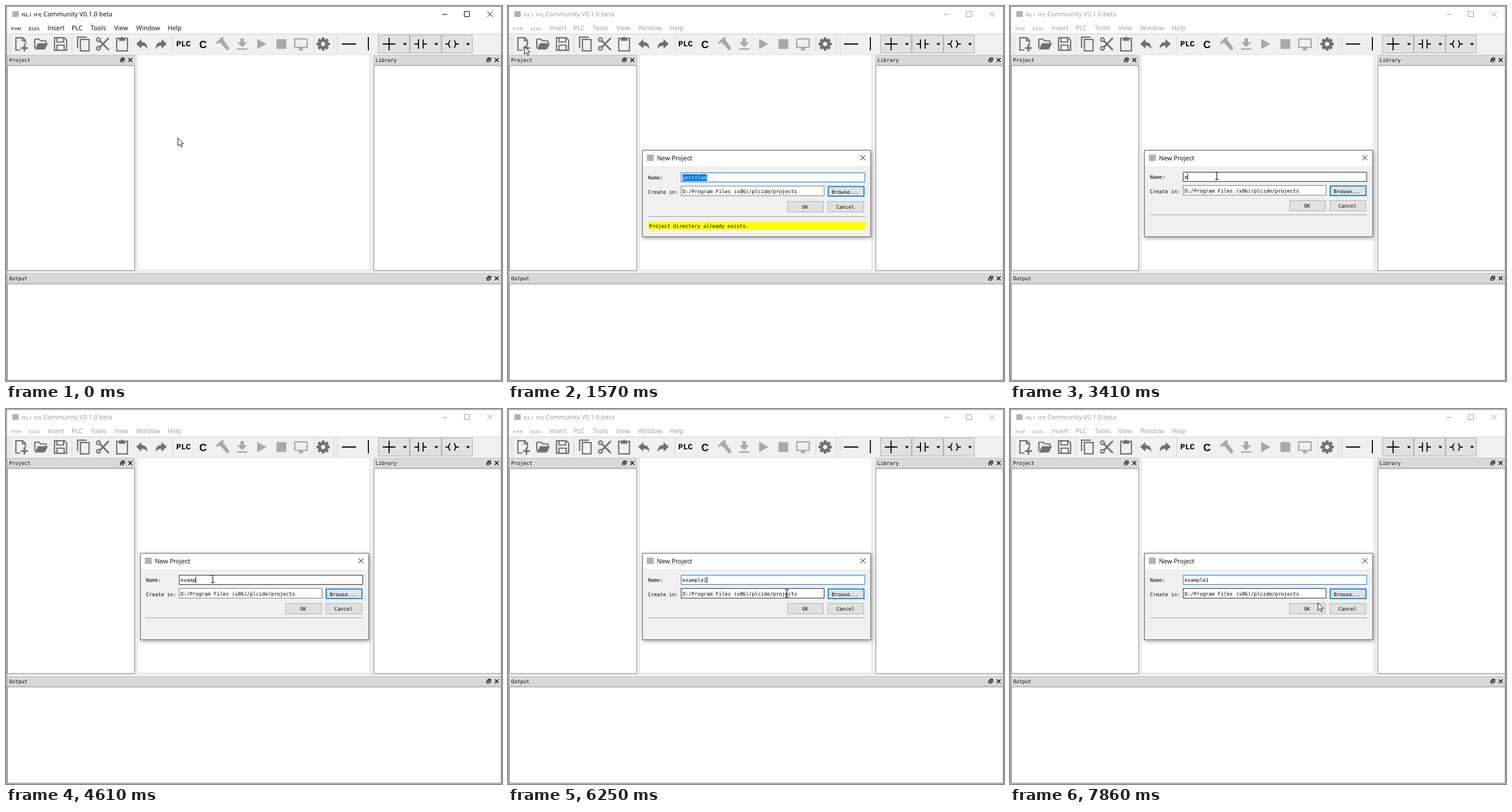
Animation of 861x651 px, one loop 8000 ms. Source, as an HTML page:

```html
<!DOCTYPE html>
<html lang="en">
<head>
<meta charset="utf-8">
<title>New project</title>
<style>
html, body { margin: 0; width: 100%; height: 100%; overflow: hidden; background: #f0f0f0; }
svg { display: block; width: 861px; height: 651px; }
text { font: 11px "Open Sans", "Noto Sans", sans-serif; text-rendering: geometricPrecision; white-space: pre; }
.mono text { font: 8.7px "DejaVu Sans Mono", monospace; }
.line { fill: none; stroke: #000; }
.icon { fill: none; stroke: #707070; stroke-width: 2.2; }
.solid { fill: #707070; stroke: none; }
.off { fill: #a8a8a8; stroke: none; }
.button { fill: #e1e1e1; stroke: #adadad; }
.field { fill: #fff; stroke: #7a7a7a; }
#chrome.inactive text { fill: #999; }
#chrome.inactive .line { stroke: #999; }
#dialog { filter: drop-shadow(1px 2px 3.500px rgba(0, 0, 0, .4)); }
</style>
</head>
<body>
<svg viewBox="0 0 861 651">
  <defs>
    <g id="dock" class="line">
      <path d="M2.500 -3.500h5v5h-5z M2.500 -2.500h5" />
      <path fill="#d9d9d9" d="M.5 -.5h5v4h-5z M.5 .5h5" />
      <path stroke-width="1.400" d="M14.500 -3l6.500 6.500m0 -6.500l-6.500 6.500" />
    </g>
    <path id="drop" d="M-3.500 -2h7l-3.500 4z" />
    <path id="grip" fill="none" stroke="#b0b0b0" stroke-dasharray="1 2" d="M.5 51v31M3.500 52v31" />
    <path id="turn" d="M0 8l9 -8v5c7 0 10 4 10.500 12c-3 -4.500 -6 -5.500 -10.500 -5.500v5z" />
  </defs>

  <rect width="861" height="651" fill="#f0f0f0" />
  <rect x="1" y="1" width="859" height="47" fill="#fff" />

  <g id="chrome">
    <rect x="11" y="9" width="11" height="10" fill="#aeb3ba" />
    <text x="27" y="18.300">RLT IFE</text>
    <text x="65" y="18.300">Community V0.1.0 beta</text>
    <g id="menu"></g>
    <path fill="#fff" d="M26 8h37v4.200h-37zM8 31h53v6h-53z" />
    <path class="line" d="M757 14.500h9M795.500 9.500h9v9h-9z" />
    <path class="line" d="M835.500 9.500l9.500 9.500m0 -9.500l-9.500 9.500" />
  </g>

  <g id="toolbar">
    <path stroke="#d0d0d0" d="M2 48.500h858M114.500 51v30M289.500 51v30M534.500 51v30M569.500 49v34" />
    <use href="#grip" x="5" />
    <use href="#grip" x="574" />
    <g class="icon">
      <path d="M25 76.500h-7.800v-21.300h12l4.500 4.500v8M28.500 55v5.500h5" />
      <path stroke-width="3" d="M26 73h12M32 67v12" />
      <path d="M50 73v-14.500q0 -1 1 -1h6l3 3h8q1.500 0 1.500 1.500v2" />
      <path class="solid" d="M50 75.500l5 -10q.5 -1 2 -1h16l-5 10q-.5 1 -2 1z" />
      <path d="M84.200 55.200h17l4 4v17.600h-21zM88.500 55v7.500h11.500v-7.500M88.500 77v-9h12.500v9" />
      <path d="M129.200 58.200h15v19.600h-15zM124.200 73v-18.800h16" />
      <circle cx="160.500" cy="58.500" r="3.200" />
      <circle cx="160.500" cy="73.500" r="3.200" />
      <path stroke-width="3" d="M163 60.500l15.500 16M163 71.500l15.500 -16" />
      <path d="M192.200 56.200h18.600v21.600h-18.600z" />
      <path class="solid" d="M196 55h3q2.500 -3.500 5 0h3v5.500h-11z" />
    </g>
    <use href="#turn" class="solid" x="226" y="57.500" />
    <use href="#turn" class="solid" transform="translate(279 57.500) scale(-1 1)" />
    <text x="295.500" y="70" style="font: bold 14px 'Liberation Mono', monospace">PLC</text>
    <text x="335.500" y="72.500" style="font: bold 18px 'Liberation Sans', sans-serif">C</text>
    <g class="off">
      <path d="M364.500 63.500l9.500 -9h5l-2.500 3.500l2.500 3l9 12.500l-4 4l-11 -12l-3 -2.500l-2.500 3.500z" />
      <path d="M407 56h6v7h5.500l-8.500 8.500l-8.500 -8.500h5.500zM401 73.500h18v2.500h-18z" />
      <path d="M436 57l16 9l-16 9zM469.500 57.500h17v17h-17z" />
      <path fill-rule="evenodd" d="M502 56h20q2 0 2 2v13q0 2 -2 2h-20q-2 0 -2 -2v-13q0 -2 2 -2zM502.300 58.300v12.400h19.400v-12.400zM509 73h6l1 4h-8z" />
    </g>
    <g class="icon">
      <circle cx="550.500" cy="66" r="6.200" stroke-width="5" />
      <g id="teeth"></g>
    </g>
    <path class="line" stroke-width="1.800" d="M583 66h25M629 54v23" />
    <path class="button" d="M646.500 50.500h54v31h-54zM701.500 50.500h54v31h-54zM756.500 50.500h53v31h-53z" />
    <path class="line" stroke-width="1.800" d="M654 66h22M665 55v22M709 66h6.500M716 58v16M724 58v16M724 66h6.500M763 66h5M781 66h5" />
    <path class="line" stroke-width="1.700" d="M771 59.500q-5 6.500 0 13M778 59.500q5 6.500 0 13" />
    <use href="#drop" x="692.500" y="66.500" />
    <use href="#drop" x="747" y="66.500" />
    <use href="#drop" x="802" y="66.500" />
  </g>

  <path fill="#fff" stroke="#dcdcdc" d="M228.500 84.500h403v374h-403z" />
  <g id="panels" class="mono"></g>
  <path fill="none" stroke="#7c7c7c" stroke-width="1.200" d="M1 1h859v648.700h-859z" />

  <g id="dialog">
    <rect x="233.500" y="250.500" width="396" height="150" fill="#f0f0f0" stroke="#666" />
    <rect x="234" y="251" width="395" height="27" fill="#fff" />
    <rect x="241" y="258" width="12" height="11" fill="#aeb3ba" />
    <text x="258.500" y="268">New Project</text>
    <path class="line" d="M611.500 259l9 9m0 -9l-9 9" />
    <g class="mono">
      <g id="nameRow">
        <text x="243" y="300">Name:</text>
        <rect id="nameField" class="field" x="300.700" y="288.600" width="318.500" height="16" />
        <rect id="selection" x="303" y="291" width="42.500" height="12" fill="#0078d7" />
        <text id="nameText" x="303" y="299.500"></text>
      </g>
      <path id="caret" class="line" d="M.5 291v11" />
      <g id="folderRow">
        <text x="243" y="325">Create in:</text>
        <rect id="folderField" class="field" x="300.700" y="311.600" width="248" height="16.700" />
        <text x="303" y="323.500">D:/Program Files (x86)/plcide/projects</text>
        <rect x="555.900" y="312.400" width="62" height="16.700" fill="#e1e1e1" stroke="#0078d7" stroke-width="1.700" />
        <text x="562" y="324.500">Browse...</text>
      </g>
      <g id="buttonRow">
        <rect id="ok" class="button" x="485.500" y="337.500" width="62" height="18" />
        <text x="510.500" y="350">OK</text>
        <rect class="button" x="555.500" y="337.500" width="62" height="18" />
        <text x="570" y="350">Cancel</text>
      </g>
      <path id="rule" stroke="#a0a0a0" d="M243 362.500h377" />
      <g id="warning">
        <rect x="243.500" y="374.600" width="376" height="13.800" fill="#ff0" />
        <text x="245" y="385">Project directory already exists.</text>
      </g>
    </g>
  </g>

  <path id="arrow" fill="#fff" stroke="#000" stroke-width=".9" stroke-linejoin="round" d="M.5 .3v13.500l3.200 -3l2.300 5.100l2.200 -1l-2.300 -4.800h4.300z" />
  <path id="beam" class="line" stroke-width="1.100" d="M-3 -6.500h2.200l.8 .7l.8 -.7h2.200M0 -6v12M-3 6.500h2.200l.8 -.7l.8 .7h2.200" />
</svg>
<script>
const $ = id => document.getElementById(id);
const LOOP = 8000, ADVANCE = 5.24;
const BLUE = '#0078d7', DARK = '#222', GREY = '#7a7a7a';

const menu = { File: 9, Edit: 39, Insert: 72, PLC: 114, Tools: 147, View: 188, Window: 226, Help: 281 };
$('menu').innerHTML = Object.entries(menu)
  .map(([label, x]) => `<text x="${x}" y="42">${label}</text>`).join('');

$('teeth').innerHTML = Array.from({ length: 8 }, (_, i) =>
  `<path stroke-width="5" d="M550.5 54.500v4" transform="rotate(${i * 45} 550.5 66)"/>`).join('');

const panel = (label, x, y, w, h) => `
  <rect x="${x + .5}" y="${y + .5}" width="${w}" height="16" fill="#d9d9d9" stroke="#bdbdbd"/>
  <text x="${x + 3.5}" y="${y + 11.5}">${label}</text>
  <use href="#dock" x="${x + w - 25}" y="${y + 8.5}"/>
  <rect x="${x + .5}" y="${y + 18.5}" width="${w}" height="${h}" fill="#fff" stroke="#828282"/>`;
$('panels').innerHTML = panel('Project', 2, 85, 221, 356)
  + panel('Library', 638, 85, 221, 356) + panel('Output', 2, 464, 857, 167);

// Each step changes only the listed properties of the one before it.
const at = (shape, x, y, more) => ({ shape, x, y, ...more });
const type = (name, warn = false) => ({ name, warn, selected: false, caret: true });
const changes = [
  [0, at('arrow', 298, 229, { active: true, open: false, name: 'untitled', selected: true, warn: true,
    caret: false, nameEdge: BLUE, folderEdge: GREY, okHover: false })],
  [370, at('arrow', 285, 222)],
  [570, at('arrow', 216, 180)],
  [780, at('arrow', 122, 118)],
  [980, at('arrow', 56, 82)],
  [1190, at('arrow', 30, 72)],
  [1390, at('arrow', 28, 70, { active: false })],
  [1570, { open: true }],
  [1770, at('arrow', 90, 112)],
  [1970, at('arrow', 265, 238)],
  [2180, at('beam', 359, 294)],
  [2410, at('beam', 359, 295, { nameEdge: DARK })],
  [2610, { caret: true }],
  [3010, { caret: false }],
  ...[3410, 3630, 4020, 4220, 4430, 4630, 4830, 5040].map((time, i) =>
    [time, type('example1'.slice(0, i + 1), i === 6)]),
  [5850, at('beam', 375, 299)],
  [6050, at('beam', 432, 314, { nameEdge: BLUE, folderEdge: DARK })],
  [6250, at('beam', 484, 320)],
  [6450, at('arrow', 515, 332)],
  [6670, at('arrow', 538, 343, { folderEdge: GREY })],
  [6870, at('arrow', 543, 346, { okHover: true })],
  [7070, at('beam', 543, 323, { okHover: false, folderEdge: DARK })],
  [7470, at('beam', 546, 325, { caret: false })],
  [7670, at('arrow', 541, 333)],
  [7860, at('arrow', 534, 336)],
];
const steps = [];
changes.forEach(([time, change]) => steps.push({ ...steps.at(-1), ...change, time }));

const show = (id, on) => $(id).setAttribute('visibility', on ? 'inherit' : 'hidden');
const move = (id, x, y) => $(id).setAttribute('transform', `translate(${x} ${y})`);

function draw(s) {
  $('chrome').classList.toggle('inactive', !s.active);
  show('dialog', s.open);
  show('warning', s.warn);
  show('selection', s.selected);
  show('caret', s.caret);
  $('nameText').textContent = s.name;
  $('nameText').style.fill = s.selected ? '#fff' : '#000';
  $('nameField').style.stroke = s.nameEdge;
  $('folderField').style.stroke = s.folderEdge;
  $('ok').style.fill = s.okHover ? '#e5f1fb' : '';
  $('ok').style.stroke = s.okHover ? BLUE : '';
  const shift = s.warn ? 1 : 0;
  move('nameRow', 0, shift);
  move('folderRow', 0, shift);
  move('buttonRow', 0, shift * 2);
  move('rule', 0, shift * 3);
  move('caret', Math.round(303 + s.name.length * ADVANCE), shift);
  for (const shape of ['arrow', 'beam']) show(shape, shape === s.shape);
  move(s.shape, s.x, s.y);
}

let current;
function tick() {
  const time = performance.now() % LOOP;
  const step = steps.findLast(s => s.time <= time);
  if (step !== current) draw(current = step);
  requestAnimationFrame(tick);
}
tick();
</script>
</body>
</html>
```
